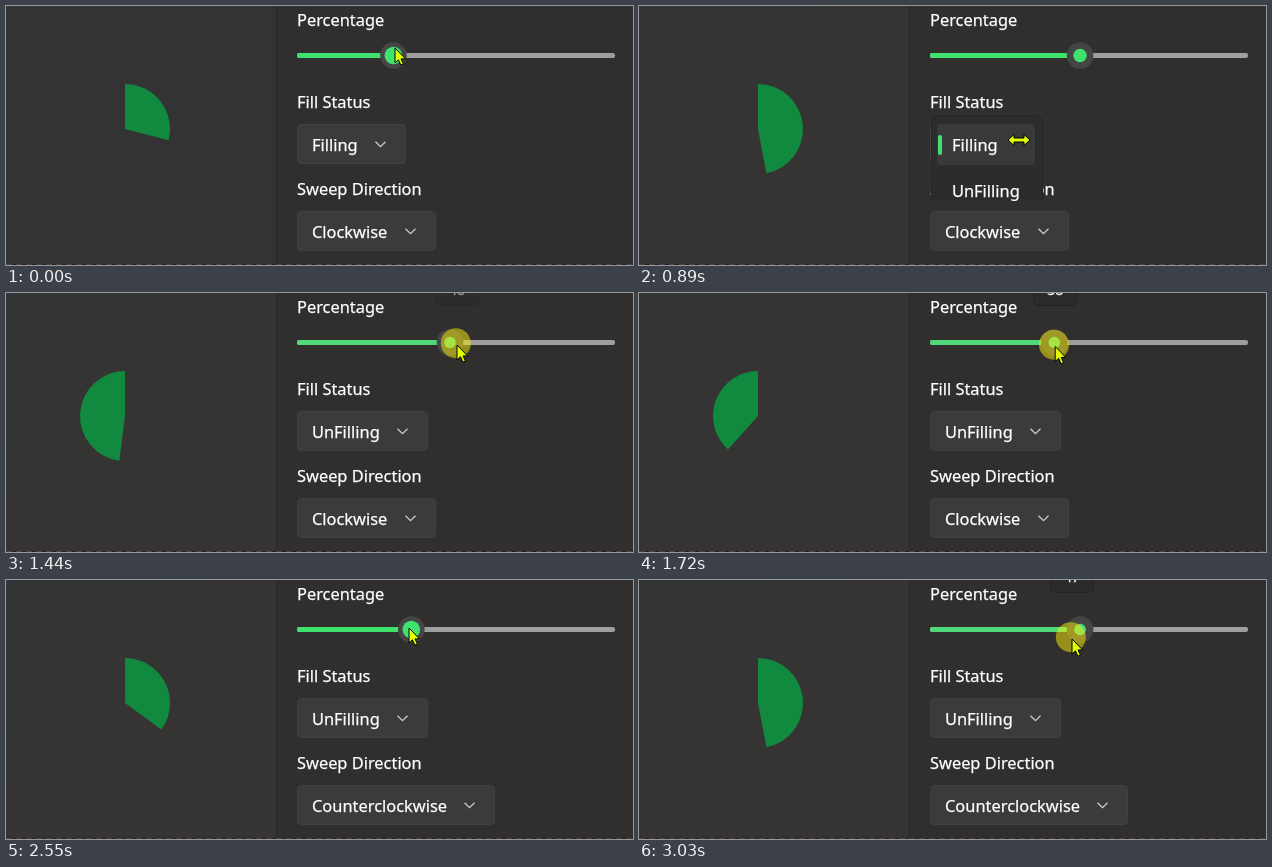
An HTML page that plays this animation: 627 by 259 pixels, repeating every 3100 ms.

```html
<!DOCTYPE html>
<html lang="en">
<head>
<meta charset="utf-8">
<title>Pie slider demo</title>
<style>
  html, body { margin: 0; width: 100%; height: 100%; overflow: hidden; background: #333; }
  svg { display: block; width: 627px; height: 259px; }
  text { font: 16.4px "Noto Sans", "Open Sans", sans-serif; fill: #fff; stroke: #fff; stroke-width: .25px; }
</style>
</head>
<body>
<svg id="stage" viewBox="0 0 627 259"></svg>
<script>
const LOOP = 3100, STEPS = 45;
const GREEN = '#3fe26f';
const FILL_MENU = { open: 12, close: 17 };
const SWEEP_MENU = { open: 29, close: 34 };
const stage = document.getElementById('stage');

// The pointer's journey; a leg with "drag" also pulls the slider to that percentage.
const HOME = { until: 0, x: 389, y: 42, percent: 29 };
const LEGS = [
  { until: 8, x: 442, y: 46, drag: 47 },
  { until: 13, x: 380, y: 134 },
  { until: 16, x: 346, y: 187, click: true },
  { until: 20, x: 449, y: 50 },
  { until: 21, x: 451, y: 52, drag: 48 },
  { until: 27, x: 404, y: 54, drag: 35 },
  { until: 30, x: 355, y: 225 },
  { until: 33, x: 355, y: 182, click: true },
  { until: 37, x: 403, y: 48 },
  { until: 41, x: 474, y: 54, drag: 59 },
  { until: 44, x: 433, y: 59, drag: 47 }
];

const lerp = (a, b, u) => a + (b - a) * u;
const smooth = u => u * u * (3 - 2 * u);
const thumbX = percent => 301 + 2.98 * percent;
const isOpen = (menu, step) => step >= menu.open && step < menu.close;

function poseAt(step) {
  let from = HOME;
  if (step <= 0) return { ...HOME, dragging: false, pressed: false };
  for (const leg of LEGS) {
    const dragging = 'drag' in leg;
    const percent = dragging ? leg.drag : from.percent;
    if (step <= leg.until) {
      const u = smooth((step - from.until) / (leg.until - from.until));
      return {
        x: lerp(from.x, leg.x, u),
        y: lerp(from.y, leg.y, u),
        percent: lerp(from.percent, percent, u),
        dragging,
        pressed: dragging || (leg.click && step === leg.until)
      };
    }
    from = { ...leg, percent };
  }
}

const label = (x, y, s) => `<text x="${x}" y="${y}">${s}</text>`;
const rect = (x, y, w, h, r, fill, more = '') =>
  `<rect x="${x}" y="${y}" width="${w}" height="${h}" rx="${r}" fill="${fill}" ${more}/>`;
const circle = (x, y, r, fill) => `<circle cx="${x}" cy="${y}" r="${r}" fill="${fill}"/>`;

function background(tinted) {
  const [start, end, panel] = tinted ? ['#323436', '#363432', '#302f2d'] : ['#333', '#333', '#2f2f2f'];
  return `<defs><linearGradient id="mica" x2="1" y2=".9">
      <stop stop-color="${start}"/><stop offset=".65" stop-color="${end}"/>
    </linearGradient></defs>` +
    rect(0, 0, 270, 259, 0, 'url(#mica)') +
    rect(270, 0, 357, 259, 0, panel) +
    rect(270, 0, 1, 259, 0, '#282828') +
    rect(0, 258, 627, 1, 0, '#241f1f') +
    '<path d="M0 258.5H627" stroke="#4b4140" stroke-dasharray="6 4"/>';
}

function pie(percent, onRight) {
  const angle = percent / 50 * Math.PI;
  const side = onRight ? 1 : -1;
  const x = 119 + side * 45 * Math.sin(angle), y = 123 - 45 * Math.cos(angle);
  return `<path fill="#11893e" d="M119 123V78A45 45 0 ${+(percent > 50)} ${+onRight} ${x} ${y}Z"/>`;
}

function slider({ x, y, percent, dragging }) {
  const knob = thumbX(percent);
  const hover = Math.hypot(x - knob, y - 49.5) < 13;
  const green = dragging ? '#50d87b' : GREEN;
  return rect(291, 47, 318, 5, 2, '#9e9e9e') +
    rect(291, 47, knob - 291, 5, 2, green) +
    circle(knob, 49.5, 13.3, '#454545') +
    circle(knob, 49.5, dragging ? 5.8 : hover ? 8.8 : 6.7, green);
}

function button(y, width, caption) {
  const x = 291 + width - 25.5;
  return rect(291.5, y + .5, width - 1, 39, 4, '#3b3b3a', 'stroke="#414140"') +
    label(306, y + 27, caption) +
    `<path d="M${x - 5} ${y + 17.7}l5 5 5-5" fill="none" stroke="#ccc" stroke-width="1.3"/>`;
}

// A two-item menu whose reveal starts at the selected row.
function menu(age, top, width, items, selected) {
  const hidden = 50 * .36 ** age;
  const clipY = selected ? top + hidden : top - 1;
  const rowY = top + 9 + selected * 46;
  return `<clipPath id="reveal"><rect x="290" y="${clipY}" width="200" height="${105 - hidden}"/></clipPath>
    <g clip-path="url(#reveal)">` +
    rect(292.5, top + .5, width, 103, 7, '#2c2c2c', 'stroke="#252525"') +
    rect(298, rowY, width - 13, 41, 4, '#393939') +
    rect(299, rowY + 11, 4, 20, 2, GREEN) +
    items.map((s, i) => label(313, top + 36 + i * 46, s)).join('') + '</g>';
}

function tooltip(x, percent, opacity) {
  return `<g opacity="${opacity}">` +
    rect(x - 21.5, -30, 43, 42.5, 5, '#2b2b2b', 'stroke="#232323"') +
    `<text x="${x}" y="1.5" text-anchor="middle" style="font-size:14px">${Math.round(percent)}</text></g>`;
}

function pointer(x, y, resize) {
  const shape = resize
    ? 'M-11 0l6-5.5v3.5h10v-3.5l6 5.5-6 5.5v-3.5h-10v3.5z'
    : 'M0 0V15L3.4 11.8 5.9 17.2 8.4 16.1 6.1 10.9H10.6Z';
  return `<path transform="translate(${x} ${y})" d="${shape}" fill="#dfff00" stroke="#000"/>`;
}

function draw(step) {
  const pose = poseAt(step);
  const { x, y, percent, dragging, pressed } = pose;
  const unfilling = step >= FILL_MENU.close, counter = step >= SWEEP_MENU.close;

  let out = background(step > 0) + pie(percent, !unfilling || counter) +
    label(291, 20, 'Percentage') + slider(pose) +
    label(291, 102, 'Fill Status') +
    (unfilling ? button(118, 131, 'UnFilling') : button(118, 109, 'Filling')) +
    label(291, 189, 'Sweep Direction') +
    (counter ? button(205, 198, 'Counterclockwise') : button(205, 139, 'Clockwise'));

  if (isOpen(FILL_MENU, step)) out += menu(step - FILL_MENU.open, 109, 111, ['Filling', 'UnFilling'], 0);
  if (isOpen(SWEEP_MENU, step)) out += menu(step - SWEEP_MENU.open, 150, 178, ['Counterclockwise', 'Clockwise'], 1);
  if (dragging) out += tooltip(x, percent, poseAt(step - 1).dragging ? 1 : .5);
  if (pressed) out += circle(x - 1.2, y - 1.8, 15, 'rgba(250,236,10,.51)');

  // The resize cursor flashes as the pointer crosses the new menu's edge.
  stage.innerHTML = out + pointer(x, y, step === FILL_MENU.open + 1);
}

let shown = 0;
const start = performance.now();
function tick(now) {
  const elapsed = Math.max(0, now - start) % LOOP;
  const step = Math.floor((elapsed + 6) * STEPS / LOOP) % STEPS;
  if (step !== shown) draw(shown = step);
  requestAnimationFrame(tick);
}
draw(shown);
requestAnimationFrame(tick);
</script>
</body>
</html>
```
